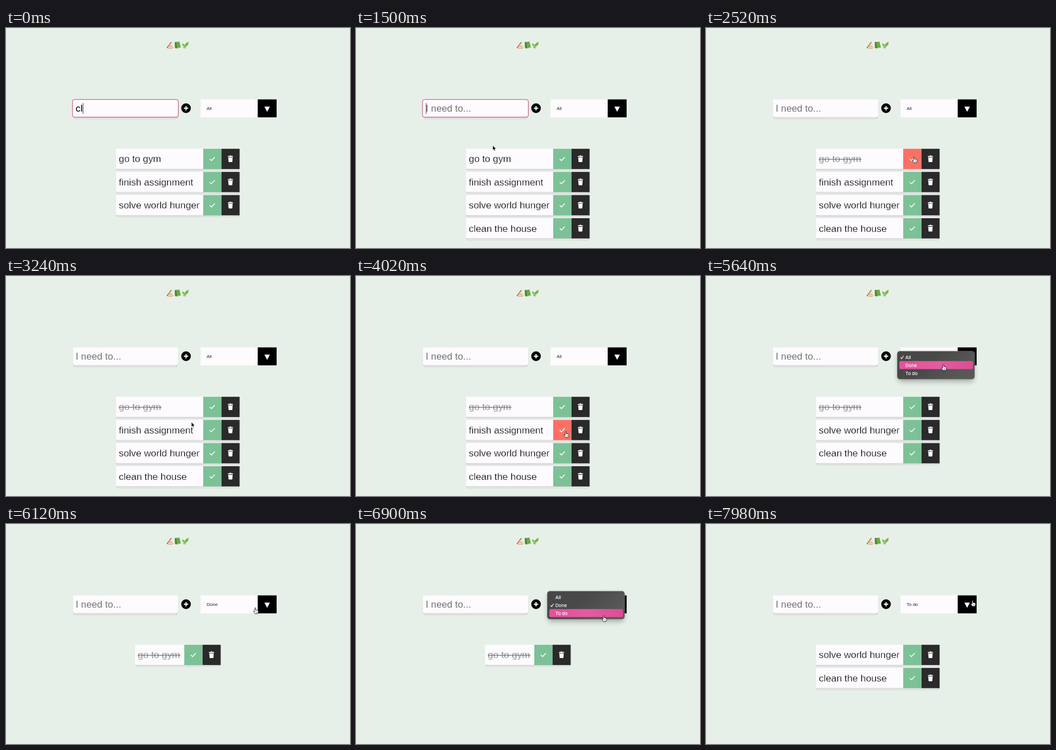
Write an HTML page that moves like this. It is 600 px wide and 384 px high and loops after 8000 ms.

```html
<!DOCTYPE html>
<html lang="en">
<head>
<meta charset="utf-8">
<title>To-do list</title>
<style>
  html, body { margin: 0; height: 100%; overflow: hidden; background: #e6f0e8; }
  svg { display: block; width: 100vw; height: 100vh; }
  text { font: 16.8px "Liberation Sans", Arial, sans-serif; white-space: pre; }
  .light { stroke: #fdfbfe; stroke-width: .3px; }
  .small { font-size: 8px; }
  .menu { font: 500 8px Inter, "Liberation Sans", sans-serif; fill: #fff; }
</style>
</head>
<body>
<svg viewBox="0 0 600 384">
  <defs>
    <linearGradient id="dark" x2="1" y2=".4">
      <stop stop-color="#464646"/><stop offset=".5" stop-color="#494949"/><stop offset="1" stop-color="#585858"/>
    </linearGradient>
    <linearGradient id="pink" x2="1">
      <stop stop-color="#e4529a"/><stop offset=".55" stop-color="#e35c9f"/><stop offset="1" stop-color="#dd4d94"/>
    </linearGradient>
    <filter id="blur" x="-20%" y="-40%" width="140%" height="190%"><feGaussianBlur stdDeviation="5"/></filter>
  </defs>
  <rect width="600" height="384" fill="#e6f0e8"/>
  <!-- hand with pencil, book, leaves -->
  <path d="M280.5 33.5q3-3.5 6-4l4 1.5 2.3 3-2 2h-9.500z" fill="#efcfb4"/>
  <path d="M282 35.600h9M285.500 31l4.500 1.500" stroke="#c99b7c" stroke-width=".7"/>
  <path d="M280.300 35l2-4 5.500-7 1.700 1.300-6 7.200z" fill="#c08a4e"/>
  <path d="M280.200 35.200l1.200-2.600 1.200 1z" fill="#443a33"/>
  <path d="M294.500 24.500l8-.8 2.700 10.800-7.700 1.500-2.800-1.200z" fill="#6fa64a"/>
  <path d="M294.500 24.500l2.700 1.300.8 9.800-3-1z" fill="#4c7f34"/>
  <path d="M297.700 35.600l7.200-1.400" stroke="#e9efdf" stroke-width=".8"/>
  <path d="M307 27q4-.5 5.500 5.500-5.500 0-5.500-5.500zM312 33q-1.500-6.500 6.500-9 .5 8-6.500 9z" fill="#83bd4d"/>
  <path d="M308 33.300q4-1.300 7 1-4 3.200-7-1z" fill="#a0cd6a"/>
  <path d="M310 35q3-5 7-9" fill="none" stroke="#60983a" stroke-width=".6"/>
  <g id="scene"></g>
</svg>
<script>
const LOOP = 8000, WHITE = '#fdfbfe', NEW_TASK = 'clean the house';
const ADD = 1080, APPEAR = 1200, BLUR = 2200, STRIKE = 2280, REMOVE = 4320;
const menus = [
  { open: 5340, close: 5900, picked: 0 },
  { open: 6660, close: 7440, picked: 1 }
];
const options = ['All', 'Done', 'To do'];
// pointer tip: time, x, y
const path = [
  [1200, 226, 160], [1500, 238.5, 205], [1860, 305, 222], [2160, 363, 225],
  [2760, 363, 225], [3300, 322, 256], [3480, 322, 256], [4020, 366, 271.5],
  [4260, 390, 268], [4500, 390, 268], [4860, 474, 178], [5220, 452, 139],
  [5340, 450, 140], [5640, 414, 154.5], [5940, 414, 154.5], [6240, 446, 142],
  [6660, 446, 142], [6900, 432, 160], [7380, 430, 157], [7440, 430, 157],
  [7620, 470, 142], [7800, 470, 142], [7960, 465, 133.5]
];

const scene = document.getElementById('scene');
const pen = document.createElement('canvas').getContext('2d');
pen.font = '16.8px "Liberation Sans", Arial, sans-serif';
const widthOf = s => pen.measureText(s).width;

const rect = (x, y, w, h, fill, more = '') =>
  `<rect x="${x}" y="${y}" width="${w}" height="${h}" fill="${fill}" ${more}/>`;
const text = (x, y, s, more = '') => `<text x="${x}" y="${y}" ${more}>${s}</text>`;
const shape = (d, more) => `<path d="${d}" ${more}/>`;
const inside = (p, x, y, w, h) => p.x >= x && p.x < x + w && p.y >= y && p.y < y + h;

// sheet of paper with a second one peeping out below
function card(x, y, w, h, r = 0) {
  const round = `rx="${r}"`;
  return rect(x + 2, y + 7, w - 4, h - 4, '#000', round + ' opacity=".2"') +
    rect(x + 2.5, y + 7.5, w - 5, h - 5, '#eeebee', round) +
    rect(x, y + .8, w, h, '#000', round + ' opacity=".2"') +
    rect(x, y, w, h, WHITE, round);
}

function pointerAt(t) {
  const i = path.findIndex(k => k[0] > t);
  if (i === 0) return { x: path[0][1], y: path[0][2] };
  if (i < 0) return { x: path.at(-1)[1], y: path.at(-1)[2] };
  const [t0, x0, y0] = path[i - 1], [t1, x1, y1] = path[i];
  const u = (t - t0) / (t1 - t0), e = u * u * (3 - 2 * u);
  return { x: x0 + (x1 - x0) * e, y: y0 + (y1 - y0) * e };
}

function tasksAt(t) {
  if (t >= 7460) return ['solve world hunger', NEW_TASK];
  if (t >= 5940) return ['go to gym'];
  const list = ['go to gym', 'finish assignment', 'solve world hunger'];
  if (t >= ADD) list.push(NEW_TASK);
  if (t >= REMOVE) list.splice(1, 1);
  return list;
}

function field(t) {
  const focus = t < BLUR, typed = t < ADD ? NEW_TASK.slice(0, 2 + Math.floor(t / 62)) : '';
  let s = card(116.5, 124.8, 184, 31, 3);
  if (focus) s += rect(116, 124.8, 184.6, 30.8, WHITE, 'rx="3.5" stroke="#c4487f"');
  s += typed ? text(121.5, 146.3, typed) : text(121.5, 146.3, 'I need to...', 'fill="#757575"');
  if (focus) s += rect(121.8 + widthOf(typed), 131, .9, 19, '#333');
  return s;
}

function controls(t) {
  const value = options[t < 5900 ? 0 : t < 7440 ? 1 : 2];
  return '<circle cx="314" cy="140" r="8.4"/>' +
    shape('M310.300 140h7.400M314 136.300v7.400', 'stroke="#fff" stroke-width="1.9"') +
    rect(339.3, 124.6, 100, 31.4, WHITE) + rect(439, 124.6, 33, 31.4, '#000') +
    shape('M450.700 137.300h9.600l-4.800 9z', 'fill="#fff"') +
    text(350, 143.4, value, 'class="small" fill="#222"');
}

function task(name, x, y, w, struck, hot) {
  const cy = y + 17.6, tx = x + 4.9;
  const trash = `M${x + w + 43} ${cy - 5}h2.600l.6-1h2.600l.6 1h2.600v1.500h-9z` +
    `m.6 2.300h7.800l-.6 7.500q-.1.900-1 .9h-4.600q-.9 0-1-.9z`;
  return card(x, y, w + 63.5, 35.3) +
    text(tx, cy + 5.9, name, `class="light" fill="${struck ? '#777' : '#000'}"`) +
    (struck ? rect(tx, cy + .2, widthOf(name) + .8, 1.1, '#666') : '') +
    rect(x + w, y, 32, 35.3, hot ? '#fb7165' : '#7dc197') +
    rect(x + w + 32, y, 31.5, 35.3, '#2a2a2a') +
    shape(`M${x + w + 11.3} ${cy + .2}l3.100 3 5.800-6.200`, 'fill="none" stroke="#fff" stroke-width="1.4"') +
    shape(trash, 'fill="#fff"');
}

function menu(t, m, p) {
  const y = 131.2 - 14 * m.picked;
  const fade = Math.min(1, Math.max(0, 1 - (t - m.close) / 120));
  let s = rect(335, y + 5, 132, 48, '#000', 'rx="5" opacity=".3" filter="url(#blur)"') +
    rect(333.6, y, 134.8, 48.8, 'url(#dark)', 'rx="4.5" stroke="#777" stroke-width=".6"');
  options.forEach((name, i) => {
    const top = y + 3.4 + 14 * i;
    if (inside(p, 334, top, 134, 14)) s += rect(337.2, top, 128.6, 14, 'url(#pink)', 'rx="2.5"');
    s += text(347.8, top + 9.9, name, 'class="menu"');
    if (i === m.picked)
      s += shape(`M339.400 ${top + 7.3}l1.800 2.300 3.400-5`, 'fill="none" stroke="#fff" stroke-width="1.100"');
  });
  return `<g opacity="${fade}">${s}</g>`;
}

function pointer(p, hand) {
  const look = hand
    ? shape('M-1 .9q0-1 .9-1t.9 1v2.700l3.400.8q1.300.4 1.100 1.700l-.5 2.500-.8 1.700h-4.300l-2.600-3.300q-.8-1.200.3-1.500l1.600.9z',
        'fill="#fff" stroke="#111" stroke-width=".8"') +
      shape('M1.300 6.500v2M2.800 6.500v2', 'stroke="#111" stroke-width=".5"')
    : shape('M0 0v8.600l2-1.900 1.300 3 1.300-.6-1.300-2.900h2.700z', 'stroke="#fff" stroke-width=".6"');
  return `<g transform="translate(${p.x} ${p.y})">${look}</g>`;
}

function draw(t) {
  const p = pointerAt(t), shown = t >= APPEAR;
  const open = menus.find(m => t >= m.open && t < m.close + 120);
  const list = tasksAt(t), w = list.length > 1 ? 152 : 86, x = 299.7 - (w + 63.5) / 2;
  let s = field(t) + controls(t);
  let hand = !!open || inside(p, 339, 124, 133, 32) || inside(p, 305, 131, 18, 18);
  list.forEach((name, i) => {
    const y = 210.8 + 40.4 * i;
    const hot = shown && inside(p, x + w, y, 32, 35.3);
    hand ||= inside(p, x + w, y, 63.5, 35.3);
    s += task(name, x, y, w, name === 'go to gym' && t >= STRIKE, hot);
  });
  if (open) s += menu(t, open, p);
  if (shown) s += pointer(p, hand);
  scene.innerHTML = s;
}

function tick() {
  draw(performance.now() % LOOP);
  requestAnimationFrame(tick);
}
tick();
</script>
</body>
</html>
```
